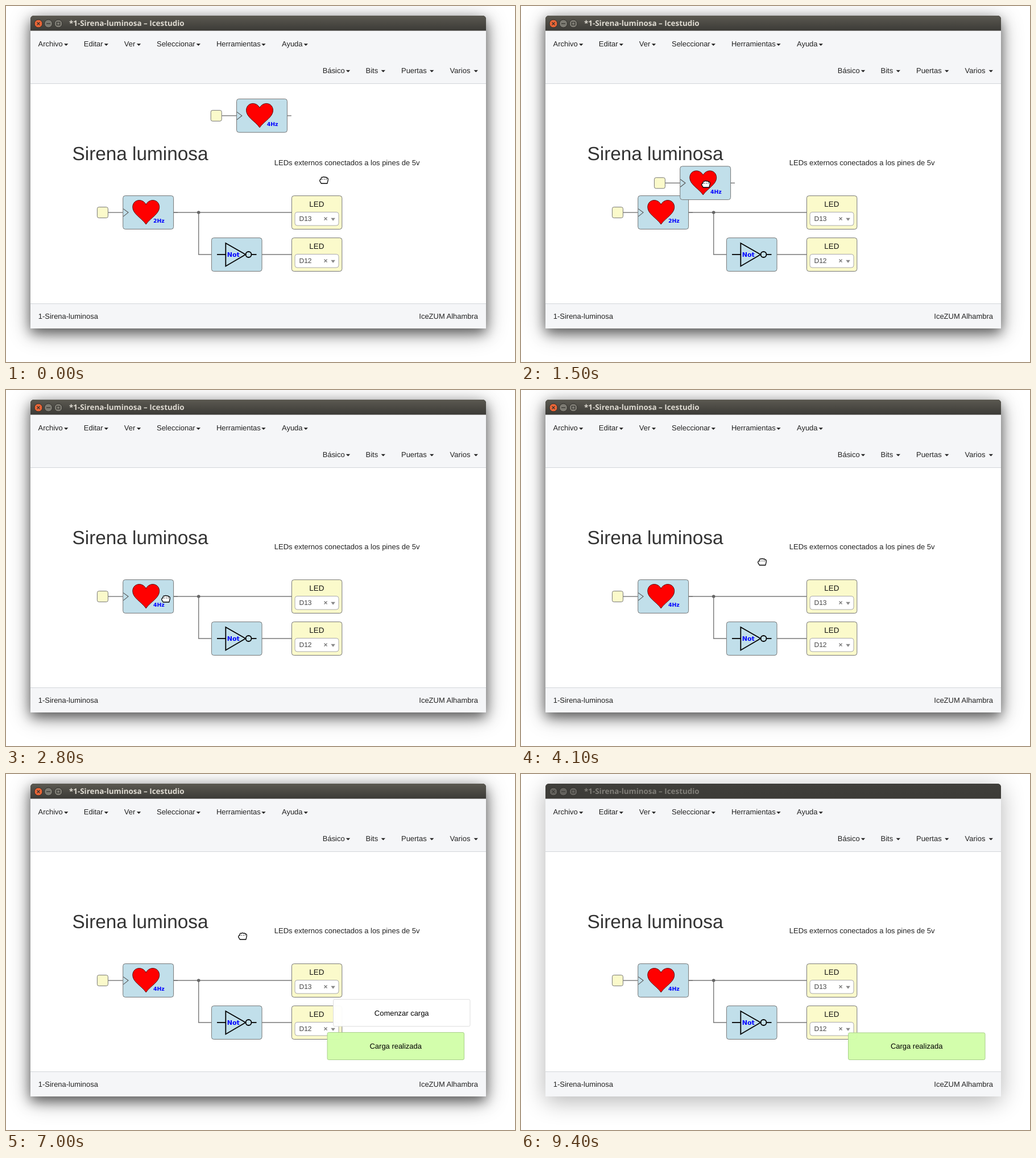
Animation of 895x626 px, one loop 9.6 s. Source, as an HTML page with a canvas:

```html
<!DOCTYPE html>
<html lang="es">
<head>
<meta charset="utf-8">
<title>Sirena luminosa</title>
<style>
  html, body { margin: 0; width: 100%; height: 100%; overflow: hidden; background: #fff; }
  canvas { display: block; }
</style>
</head>
<body>
<canvas id="stage" width="895" height="626"></canvas>
<script>
const W = 895, H = 626, LOOP = 9600, STEP = 100, GRID = 7.4;
const ctx = document.getElementById('stage').getContext('2d');
const WIN = { x: 43, y: 17, w: 801, h: 550 };
const SANS = '"Liberation Sans", Arial, sans-serif';
const BOLD = '"DejaVu Sans", sans-serif';
const BLUE = '#c1dfea', YELLOW = '#fbfacb', LINE = '#777';
const HOME = { x: 205.7, y: 333.6 }, START = { x: 405.5, y: 163.4 };
const DRAG = 800, DROP = 2600, BUILD = 4400, HINT = 4500, DONE = 6800, LEAVE = 7600, BLUR = 9400;

// Pointer path: time, x, y, eased
const PATH = [
  [100, 559, 306], [700, 458, 192, 1], [DRAG, 458, 192], [1500, 325, 313],
  [1800, 293, 327], [2300, 281, 348], [2500, 259, 364], [DROP, 259, 364],
  [2800, 281, 367], [3300, 281, 367], [4100, 424, 302, 1], [DONE, 424, 302],
  [7000, 416, 285], [7300, 411, 272], [8200, 80, -12, 1]
];
const MENU = [
  ['Archivo', 56.5, 71, 102], ['Editar', 136.8, 71, 172.6], ['Ver', 207.8, 71, 229.8],
  ['Seleccionar', 265, 71, 334.6], ['Herramientas', 370, 71, 449.2], ['Ayuda', 485, 71, 523.5],
  ['Básico', 556.8, 117.5, 597.8], ['Bits', 632.6, 117.5, 659.6],
  ['Puertas', 695, 117.5, 745], ['Varios', 780.6, 117.5, 822.6]
];

const clamp = v => Math.min(1, Math.max(0, v));

function pointer(t) {
  let a = PATH[0];
  for (const b of PATH) {
    if (t <= b[0]) {
      let u = b === a ? 0 : clamp((t - a[0]) / (b[0] - a[0]));
      if (b[3]) u = u * u * (3 - 2 * u);
      return { x: a[1] + (b[1] - a[1]) * u, y: a[2] + (b[2] - a[2]) * u };
    }
    a = b;
  }
  return { x: a[1], y: a[2] };
}

// cubic-bezier(.175, .885, .32, 1.275)
function backOut(x) {
  if (x <= 0) return 0;
  if (x >= 1) return 1;
  const curve = (s, a, b) => 3 * (1 - s) * (1 - s) * s * a + 3 * (1 - s) * s * s * b + s * s * s;
  let lo = 0, hi = 1;
  for (let i = 0; i < 24; i++) {
    const mid = (lo + hi) / 2;
    if (curve(mid, .175, .32) < x) lo = mid; else hi = mid;
  }
  return curve(lo, .885, 1.275);
}

function text(s, x, y, font, color = '#222', align = 'left') {
  ctx.font = font;
  ctx.fillStyle = color;
  ctx.textAlign = align;
  ctx.fillText(s, x, y);
}

const label = (s, x, y, color, align) => text(s, x, y, '12.96px ' + SANS, color, align);

function box(x, y, w, h, r, fill, stroke, width = 1) {
  ctx.beginPath();
  ctx.roundRect(x, y, w, h, r);
  ctx.fillStyle = fill;
  ctx.fill();
  if (stroke) {
    ctx.strokeStyle = stroke;
    ctx.lineWidth = width;
    ctx.stroke();
  }
}

function line(points, color = LINE, width = 1.4, closed = false) {
  ctx.beginPath();
  points.forEach(([x, y]) => ctx.lineTo(x, y));
  if (closed) ctx.closePath();
  ctx.strokeStyle = color;
  ctx.lineWidth = width;
  ctx.stroke();
}

function disc(x, y, r, fill, stroke, width = 1) {
  ctx.beginPath();
  ctx.arc(x, y, r, 0, Math.PI * 2);
  if (fill) { ctx.fillStyle = fill; ctx.fill(); }
  if (stroke) { ctx.strokeStyle = stroke; ctx.lineWidth = width; ctx.stroke(); }
}

function caret(x, y, w, h, color) {
  ctx.beginPath();
  ctx.moveTo(x, y);
  ctx.lineTo(x + w, y);
  ctx.lineTo(x + w / 2, y + h);
  ctx.fillStyle = color;
  ctx.fill();
}

function makeShadow(active) {
  const layer = document.createElement('canvas');
  layer.width = W;
  layer.height = H;
  const c = layer.getContext('2d');
  c.fillStyle = '#fff';
  c.fillRect(0, 0, W, H);
  c.fillStyle = '#3c3b37';
  c.shadowOffsetY = 8;
  const cast = (blur, alpha) => {
    c.shadowBlur = blur;
    c.shadowColor = `rgba(0,0,0,${alpha})`;
    c.beginPath();
    c.roundRect(WIN.x, WIN.y, WIN.w, WIN.h, [6, 6, 0, 0]);
    c.fill();
  };
  cast(40, .3);
  if (active) cast(22, .55);
  return layer;
}
const shadows = { true: makeShadow(true), false: makeShadow(false) };

function titleBar(active) {
  const g = ctx.createLinearGradient(0, 17, 0, 43);
  g.addColorStop(0, active ? '#5b5951' : '#403f3b');
  g.addColorStop(1, '#3c3b37');
  box(WIN.x, WIN.y, WIN.w, 27, [6, 6, 0, 0], g);
  const ink = active ? '#34332f' : '#3c3b37', gray = active ? '#7d7b73' : '#65635e';
  disc(57, 31, 7, active ? '#eb6637' : gray, '#2f2e2a');
  disc(74.5, 31, 7, gray, '#2f2e2a');
  disc(92, 31, 7, gray, '#2f2e2a');
  line([[54.5, 28.5], [59.5, 33.5]], ink, 1.3);
  line([[59.5, 28.5], [54.5, 33.5]], ink, 1.3);
  line([[71, 31], [78, 31]], ink, 1.3);
  line([[89.3, 28.5], [94.7, 28.5], [94.7, 33.5], [89.3, 33.5]], ink, 1.2, true);
  text('*1-Sirena-luminosa – Icestudio', 111, 35.2, 'bold 13.4px "Open Sans", sans-serif',
    active ? '#dfdbd2' : '#807e78');
}

function chrome(active, busy) {
  ctx.drawImage(shadows[active], 0, 0);
  titleBar(active);
  ctx.fillStyle = '#f5f6f8';
  ctx.fillRect(43, 43.5, 801, 93);
  ctx.fillRect(43, 523, 801, 44);
  ctx.fillStyle = '#fff';
  ctx.fillRect(43, 136, 801, 388);
  ctx.fillStyle = '#d2d6da';
  ctx.fillRect(43, 136, 801, 1);
  ctx.fillRect(43, 523, 801, 1);
  for (const [name, x, y, cx] of MENU) {
    label(name, x, y, busy ? '#666' : '#222');
    caret(cx, y - 4.8, 7.4, 3.8, '#222');
  }
  label('1-Sirena-luminosa', 56.8, 550);
  label('IceZUM Alhambra', 830, 550, '#222', 'right');
}

function clockWire({ x, y }) {
  line([[x - 26, y + 29.5], [x, y + 29.5]]);
}

function heartBlock({ x, y }, rate) {
  ctx.save();
  ctx.translate(x, y);
  box(-45.3, 20, 19, 19, 3, YELLOW, LINE);
  line([[88.9, 29.5], [96.3, 29.5]]);
  box(0, 0, 88.9, 58.8, 4, BLUE, LINE);
  line([[.5, 23], [9.3, 29.5], [.5, 36.5]], '#555', 1.1);
  ctx.beginPath();
  ctx.moveTo(40.5, 15.5);
  ctx.bezierCurveTo(37.5, 10, 33, 8, 28.5, 8);
  ctx.bezierCurveTo(21.5, 8, 17, 13.5, 17, 20);
  ctx.bezierCurveTo(17, 32, 32, 38.5, 40.5, 50.3);
  ctx.bezierCurveTo(49, 38.5, 64, 32, 64, 20);
  ctx.bezierCurveTo(64, 13.5, 59.5, 8, 52.5, 8);
  ctx.bezierCurveTo(48, 8, 43.5, 10, 40.5, 15.5);
  ctx.closePath();
  ctx.fillStyle = '#f00';
  ctx.fill();
  ctx.strokeStyle = '#300';
  ctx.lineWidth = .8;
  ctx.stroke();
  text(rate, 53.2, 47.8, 'bold 9.4px ' + BOLD, '#00f');
  ctx.restore();
}

function ledBlock(y, pin) {
  box(502.4, y, 88.4, 58.8, 4, YELLOW, LINE);
  text('LED', 546.3, y + 19.4, '13.4px ' + SANS, '#111', 'center');
  box(508, y + 28.8, 77, 23.5, 4, '#fff', '#aaa');
  text(pin, 515.5, y + 44.7, '12px ' + SANS, '#444');
  text('×', 562, y + 44.4, 'bold 12px ' + SANS, '#777', 'center');
  caret(571.3, y + 39, 7.6, 5, '#888');
}

function notBlock() {
  box(361.4, 407.7, 88.6, 58.8, 4, BLUE, LINE);
  line([[371, 437], [386, 437]], '#000', 1.8);
  line([[386.3, 417], [386.3, 457.5], [421.3, 437]], '#000', 1.8, true);
  disc(426.5, 437, 5, null, '#000', 1.8);
  line([[431.5, 437], [440.5, 437]], '#000', 1.8);
  text('Not', 388.8, 441, 'bold 11px ' + BOLD, '#00f');
}

function diagram(t) {
  const dragging = t < DROP;
  const p = pointer(Math.max(t - 25, DRAG));
  const snap = d => Math.round(d / GRID) * GRID;
  const loose = { x: START.x + snap(p.x - 458), y: START.y + snap(p.y - 192) };

  text('Sirena luminosa', 116.5, 270.5, '33.33px ' + SANS, '#333');
  label('LEDs externos conectados a los pines de 5v', 471.8, 280);

  line([[294, 363], [502, 363]]);
  line([[338.7, 363], [338.7, 437], [361, 437]]);
  line([[450, 437], [502, 437]]);
  disc(338.7, 363, 2.8, '#666');
  clockWire(HOME);
  if (dragging) clockWire(loose);

  heartBlock(HOME, dragging ? '2Hz' : '4Hz');
  notBlock();
  ledBlock(333.7, 'D13');
  ledBlock(407.7, 'D12');
  if (dragging) heartBlock(loose, '4Hz');
}

function toast(s, shift, bottom, h, fill, border) {
  const x = 575.5 + 565 * shift, y = bottom - h;
  if (x > 844) return;
  ctx.save();
  ctx.beginPath();
  ctx.rect(WIN.x, WIN.y, WIN.w, WIN.h);
  ctx.clip();
  box(x, y, 240.5, h - .5, 2.5, fill, border);
  ctx.clip();
  label(s, x + 120.2, y + h / 2 + 4.4, '#000', 'center');
  ctx.restore();
}

function toasts(t) {
  const hint = backOut((t - HINT) / 500), done = backOut((t - DONE) / 500);
  if (t >= HINT) {
    const out = clamp((t - LEAVE) / 500);
    const lift = t >= DONE ? 18 + 40 * done : 0;
    const h = out > 0 ? 30 * (1 - out) + 1 : 18 + 30 * hint;
    toast('Comenzar carga', 1 - hint + out, 503 - lift, h, 'rgba(255,255,255,.96)', '#ddd');
  }
  if (t >= DONE) {
    toast('Carga realizada', 1 - done, 503, 18 + 30 * done, 'rgba(210,254,170,.97)', '#a9cf8b');
  }
}

function hand({ x, y }) {
  ctx.save();
  ctx.translate(x, y);
  ctx.beginPath();
  ctx.moveTo(-4.8, 6);
  ctx.bezierCurveTo(-5.5, 4, -7.4, 3, -7.3, .8);
  ctx.bezierCurveTo(-7.2, -1.2, -6, -1.4, -4.9, -1);
  ctx.lineTo(-4.9, -3);
  ctx.quadraticCurveTo(-3.9, -6.2, -1.9, -4.6);
  ctx.quadraticCurveTo(0, -6.8, 1.7, -4.6);
  ctx.quadraticCurveTo(3.8, -6, 4.7, -3.7);
  ctx.quadraticCurveTo(7.3, -4, 7.3, -1);
  ctx.bezierCurveTo(7.3, 2, 6.4, 3.5, 5.8, 6);
  ctx.closePath();
  ctx.fillStyle = '#fff';
  ctx.fill();
  ctx.strokeStyle = '#000';
  ctx.lineWidth = 1.3;
  ctx.lineJoin = 'round';
  ctx.stroke();
  for (const dx of [-1.9, 1.4, 4.3]) line([[dx, -2.2], [dx, -.6]], '#000', 1);
  ctx.restore();
}

function spinner(t) {
  const x = 424.5, y = 301;
  disc(x, y, 8, '#fff', '#222', 1.3);
  for (let i = 0; i < 8; i++) {
    const a = (i + t / STEP) * Math.PI / 4;
    disc(x + 4.6 * Math.cos(a), y + 4.6 * Math.sin(a), 1.1, `rgba(0,0,0,${.12 + i * .1})`);
  }
}

function draw(t) {
  const busy = t >= BUILD && t < DONE;
  ctx.textRendering = 'geometricPrecision';
  chrome(t < BLUR, busy);
  diagram(t);
  toasts(t);
  if (busy) spinner(t);
  else if (t < 8200) hand(pointer(t));
}

const origin = performance.now();
let shown = -1;
function tick() {
  const t = Math.floor((performance.now() - origin) % LOOP / STEP) * STEP;
  if (t !== shown) draw(shown = t);
  requestAnimationFrame(tick);
}
tick();
</script>
</body>
</html>
```
